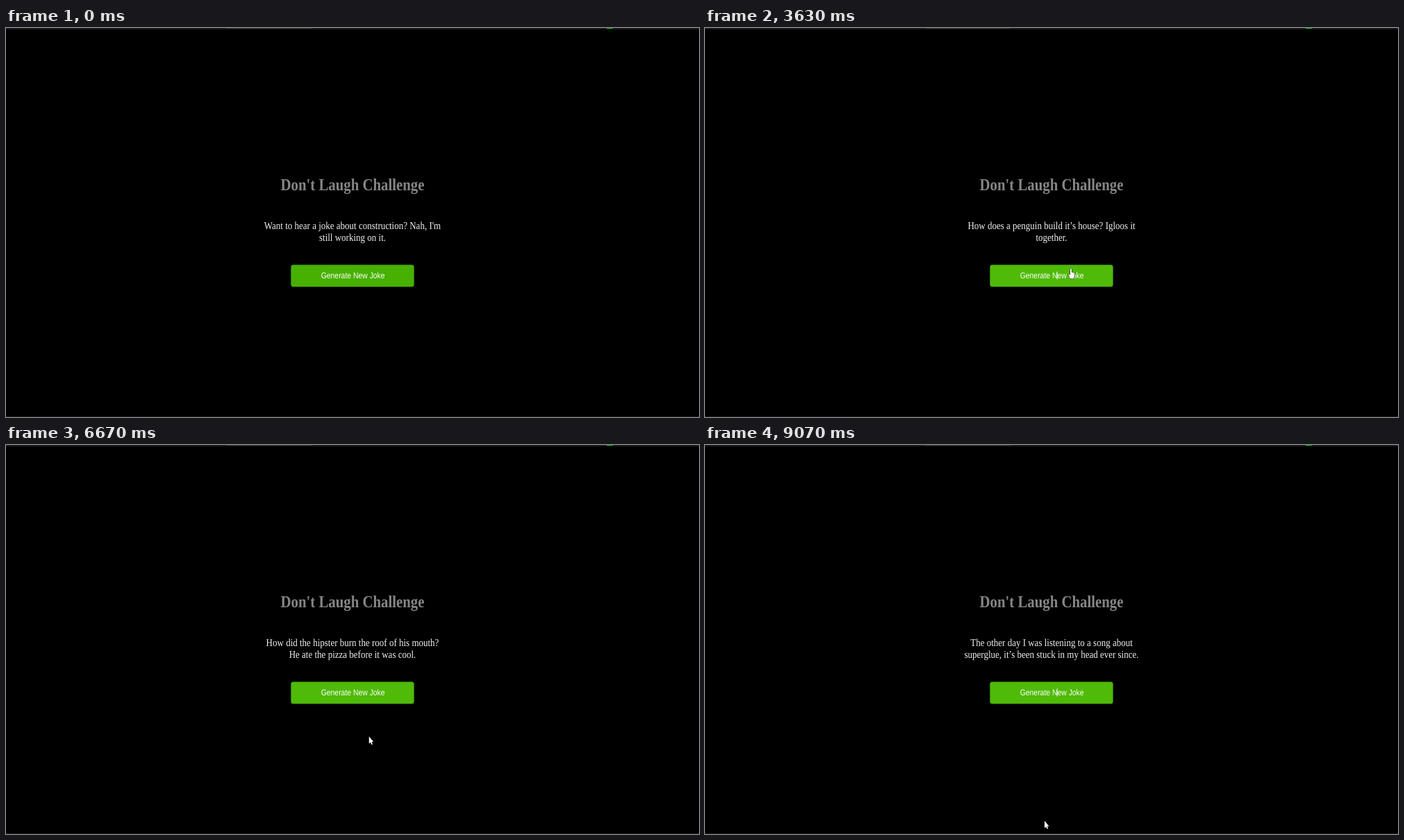
These frames come from a looping animation (998x561 px, 9.11 s). An HTML page:

```html
<!DOCTYPE html>
<html lang="en">
<head>
<meta charset="utf-8">
<title>Don't Laugh Challenge</title>
<style>
  html, body { margin: 0; width: 100%; height: 100%; overflow: hidden; background: #000; }
  svg { display: block; width: 998px; height: 561px; }
  text { text-anchor: middle; text-rendering: geometricPrecision; }
  .title { font: bold 32px "Liberation Serif", "Times New Roman", serif; fill: #858585; }
  .joke { font: 20px "Liberation Serif", "Times New Roman", serif; fill: #f0f0f0; }
  .label { font: 16px "Liberation Sans", Arial, sans-serif; fill: #fff; }
  .face { stroke: #3f9a0c; animation: face 9110ms step-end infinite; }
  .cursor { fill: #fff; stroke: #000; paint-order: stroke; stroke-linejoin: round; }
  @keyframes face { 0% { fill: #47b000; } .33% { fill: #50ba08; } }
</style>
</head>
<body>
<svg viewBox="0 0 998 561">
  <rect width="998" height="561"/>
  <rect width="998" height="1" fill="#16191c"/>
  <rect y="1" width="998" height="1" fill="#1a1a1a"/>
  <rect x="317" width="123" height="1" fill="#34352c"/>
  <rect x="865" width="9" height="1" fill="#00c800"/>
  <rect y="560" width="998" height="1" fill="#1a1a1a"/>

  <!-- the page is shown scaled to the stage -->
  <g transform="translate(499 0) scale(.65 .76)">
    <g id="heading">
      <text class="title" y="308">Don't Laugh Challenge</text>
      <text id="line1" class="joke" y="382"></text>
    </g>
    <text id="line2" class="joke" y="404.4"></text>
    <g id="button">
      <rect class="face" x="-136" y="449.8" width="272" height="41" rx="4"/>
      <text class="label" x="1" y="475.4">Generate New Joke</text>
      <rect id="caret" x="12" y="462" width="1.3" height="15.5" fill="#e8ffe0"/>
    </g>
  </g>

  <g id="cursor" class="cursor">
    <path id="arrow" d="M0 0V10.4L2.2 8.5L3.6 11.8L5.2 11.1L3.8 7.9L6.4 7.7Z"/>
    <path id="hand" d="M-1 .8Q0 -.6 1 .8V5L4.6 6Q5.4 6.4 5.3 8V10.5L4 13V14.5H-1.5V13L-3.5 9.2Q-3.6 7.8 -2.4 8.2L-1 9.6Z"/>
  </g>
</svg>
<script>
  const LOOP = 9110, HALF_LINE = 11.2;
  const $ = id => document.getElementById(id);
  const show = (id, on) => $(id).setAttribute("visibility", on ? "visible" : "hidden");
  const place = (id, x, y) => $(id).setAttribute("transform", `translate(${x} ${y})`);

  const jokes = [
    { at: 0, lines: ["Want to hear a joke about construction? Nah, I'm", "still working on it."] },
    { at: 3230, lines: ["How does a penguin build it’s house? Igloos it", "together."], caret: true },
    { at: 4030, lines: ["I wanted to be a tailor but I didn't suit the job"] },
    { at: 6470, lines: ["How did the hipster burn the roof of his mouth?", "He ate the pizza before it was cool."] },
    { at: 8600, lines: ["The other day I was listening to a song about", "superglue, it’s been stuck in my head ever since."], caret: true }
  ];

  // the pointer enters from the right, then rests between moves
  const entry = { x: 1000, y: 270 };
  const moves = [
    { from: 960, to: 1430, x: 554, y: 327 },
    { from: 1430, to: 1870, x: 527, y: 347 },
    { from: 4540, to: 4900, x: 570, y: 473 },
    { from: 4900, to: 5770, x: 497.5, y: 355 },
    { from: 6470, to: 6850, x: 530, y: 439 },
    { from: 6850, to: 7530, x: 529, y: 264 },
    { from: 7530, to: 7780, x: 545, y: 428 },
    { from: 7780, to: 8030, x: 515, y: 350 },
    { from: 8870, to: 9070, x: 489, y: 542 }
  ];

  const easeOut = k => 1 - (1 - k) ** 2;

  function tipAt(t) {
    let { x, y } = entry;
    for (const m of moves) {
      if (t < m.from) break;
      const k = easeOut(Math.min(1, (t - m.from) / (m.to - m.from)));
      x += (m.x - x) * k;
      y += (m.y - y) * k;
    }
    return { x, y };
  }

  function draw(t) {
    const { lines, caret } = jokes.filter(j => j.at <= t).pop();
    const shift = lines.length > 1 ? 0 : HALF_LINE;
    $("line1").textContent = lines[0];
    $("line2").textContent = lines[1] || "";
    place("heading", 0, shift);
    place("button", 0, -shift);
    show("caret", caret);

    const { x, y } = tipAt(t);
    const middle = 357.4 - shift * .76;
    const over = Math.abs(x - 499) < 89 && Math.abs(y - middle) < 18;
    show("arrow", !over);
    show("hand", over);
    place("cursor", x, y);
  }

  function tick() {
    draw(performance.now() % LOOP);
    requestAnimationFrame(tick);
  }
  tick();
</script>
</body>
</html>
```
